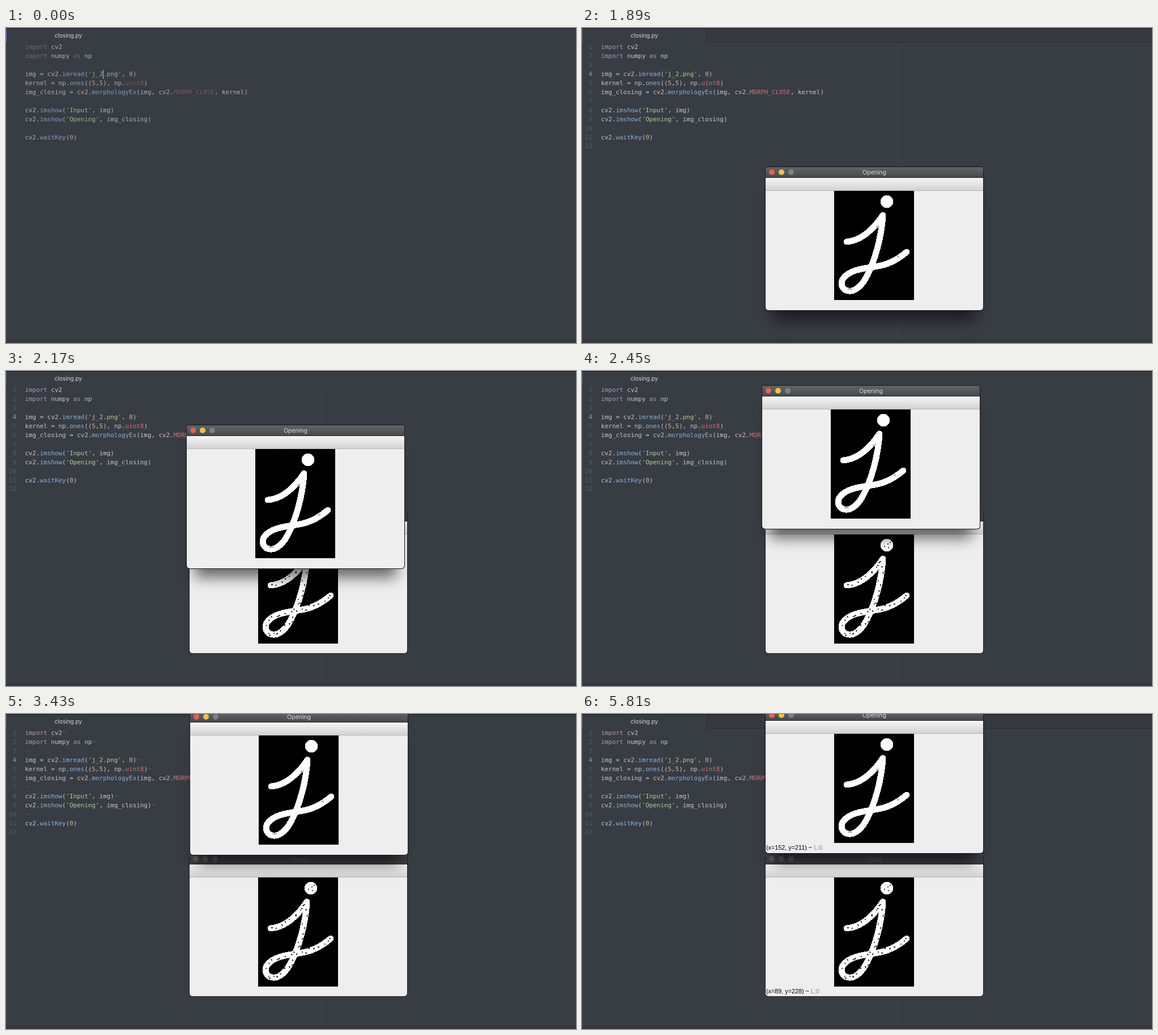
An HTML page for the animation above (5.88 s loop, 1006 by 557 pixels).

```html
<!DOCTYPE html>
<html lang="en">
<head>
<meta charset="utf-8">
<title>closing.py</title>
<style>
html, body { margin: 0; width: 100%; height: 100%; overflow: hidden; background: #383c43; }
#stage { position: absolute; inset: 0; width: 1006px; height: 557px; overflow: hidden; background: #383c43; }
#stage div, #stage pre { position: absolute; margin: 0; box-sizing: border-box; }
#topline { left: 0; top: 0; width: 1006px; height: 1px; background: #17191d; }
#foot { left: 0; top: 551px; width: 1006px; height: 6px; background: #35383e; }
#bar { left: 220px; top: 1px; width: 786px; height: 25px; background: #35383e; border: solid #2c2f34; border-width: 0 0 1px 1px; }
#accent { left: 0; top: 1px; width: 1px; height: 25px; }
#tab { left: 0; top: 1px; width: 220px; height: 25px; text-align: center; color: #d5d8dc; font: 10px/25px Inter, sans-serif; }
#guide { left: 557px; top: 27px; width: 1px; height: 524px; background: #434750; }
pre { font: 10.9px/15.95px "DejaVu Sans Mono", monospace; top: 26px; color: #c5c8c6; }
#gutter { left: 0; width: 18px; text-align: right; color: #585c63; }
#gutter b { color: #9b9fa6; }
#code { left: 33.5px; }
#code *, #gutter * { font-style: normal; font-weight: normal; text-decoration: none; }
#code b { color: #b294bb; }
#code i { color: #8ab2d8; }
#code u { color: #b9cb90; }
#code s { color: #d9b184; }
#code em { color: #c9727a; }
#code q { color: #5c6067; quotes: none; }
.idle #code { opacity: .82; }
.idle #code b, .idle #code em { opacity: .6; }
#caret { left: 171px; top: 74px; width: 1px; height: 16px; background: #a9c4f5; }
.win { left: 0; top: 0; width: 384px; height: 253px; border-radius: 5px; background: #eee; overflow: visible;
  box-shadow: 0 0 0 1px #15161a, 0 30px 24px -14px rgba(0,0,0,.58); }
.title { left: 0; top: 0; width: 384px; height: 19px; border-radius: 5px 5px 0 0; text-align: center; color: #d9dadb;
  font: 10.5px/19px Inter, sans-serif; background: linear-gradient(#636466, #48494b); border-bottom: 1px solid #222; }
.light { top: 4px; width: 10px; height: 10px; border-radius: 50%; }
.tools { left: 0; top: 19px; width: 384px; height: 23px; background: linear-gradient(#f5f5f5, #d3d3d3); border-bottom: 1px solid #b8b8b8; }
.win svg { position: absolute; left: 121px; top: 42px; background: #000; }
.status { left: 1px; top: 235px; color: #000; font: 10.8px/16px "Liberation Sans", Arial, sans-serif; white-space: pre; }
.status span { color: #8b8b8b; }
#input { height: 252px; box-shadow: 0 0 0 1px #1b1d21; }
#input .title { background: #3d3f45; color: #5b5d62; }
#input .light { background: #5a5c60 !important; }
</style>
</head>
<body>
<div id="stage">
  <div id="bar"></div><div id="tab">closing.py</div>
  <div id="topline"></div><div id="accent"></div><div id="guide"></div><div id="foot"></div>
  <pre id="gutter"></pre>
  <pre id="code"><b>import</b> cv2
<b>import</b> numpy <b>as</b> np

img = cv2.<i>imread</i>(<u>'j_2.png'</u>, <s>0</s>)
kernel = np.<i>ones</i>((<s>5</s>,<s>5</s>), np.<em>uint8</em>)
img_closing = cv2.<i>morphologyEx</i>(img, cv2.<em>MORPH_CLOSE</em>, kernel)

cv2.<i>imshow</i>(<u>'Input'</u>, img)
cv2.<i>imshow</i>(<u>'Opening'</u>, img_closing)

cv2.<i>waitKey</i>(<s>0</s>)</pre>
  <div id="caret"></div>
</div>
<script>
const $ = id => document.getElementById(id);
const stage = $('stage');
const LOOP = 5880, STEP = 70;

$('gutter').innerHTML = Array.from({length: 12}, (_, i) => i === 3 ? '<b>4</b>' : i + 1).join('\n');
$('code').innerHTML = $('code').innerHTML.split('\n').map(line => line + '<q>¬</q>').join('\n');
const eols = [...document.querySelectorAll('q')];

// The handwritten letter: hook, then stem, loop and tail
const hook = 'M22 90C46 88 68 70 86 43';
const stem = 'M86 43C84 80 72 125 56 154C46 172 34 178 26 177C14 176 10 164 16 155C26 140 52 137 72 134C95 131 112 122 128 108';

function addWindow(id, title, marks) {
  const lights = ['#e0625b', '#f0c04c', '#808184'].map((c, i) =>
    `<div class="light" style="left:${6 + 17 * i}px;background:${c}"></div>`).join('');
  stage.insertAdjacentHTML('beforeend', `<div class="win" id="${id}">
    <div class="title">${title}${lights}</div><div class="tools"></div>
    <svg width="141" height="193" shape-rendering="crispEdges">
      <g fill="none" stroke="#fff" stroke-width="11" stroke-linecap="round" stroke-linejoin="round">
        <path d="${hook}"/><path d="${stem}"/></g>
      <circle cx="93" cy="19" r="11.3" fill="#fff"/>${marks}</svg>
    <div class="status"></div></div>`);
  return $(id);
}

let seed = 11;
const rand = () => (seed = seed * 16807 % 2147483647) / 2147483647;
const speck = (x, y) => `<circle cx="${x}" cy="${y}" r="1.4" fill="#444"/>`;

function specksAlong(d) {
  const path = document.createElementNS('http://www.w3.org/2000/svg', 'path');
  path.setAttribute('d', d);
  let out = '';
  for (let s = 6; s < path.getTotalLength(); s += 5 + 7 * rand()) {
    const p = path.getPointAtLength(s);
    out += speck(p.x + 7 * (rand() - .5), p.y + 7 * (rand() - .5));
  }
  return out;
}

const holes = specksAlong(hook) + specksAlong(stem) +
  [[89, 21], [95, 17], [99, 14], [96, 23]].map(p => speck(...p)).join('');
const smudges = [[74, 62, 4, 3], [111, 115, 4, 3], [24, 172, 8, 3]].map(([x, y, w, h]) =>
  `<rect x="${x}" y="${y}" width="${w}" height="${h}" fill="#bbb"/>`).join('');
const input = addWindow('input', 'Input', holes);
const opening = addWindow('opening', 'Opening', smudges);

// Drag of the front window: time, x, y
const drag = [[1960, 324, 246], [2030, 322, 206], [2170, 319, 96], [2310, 318, 52], [2450, 318, 26],
  [2730, 319, 3], [3360, 325, -4], [3430, 325, -4], [3990, 324, -7]];

const clamp = v => Math.max(0, Math.min(1, v));
const mix = (a, b, p) => Math.round(a + (b - a) * p);

function dragAt(t) {
  let i = 0;
  while (i < drag.length - 2 && t > drag[i + 1][0]) i++;
  const [a, b] = [drag[i], drag[i + 1]];
  const p = clamp((t - a[0]) / (b[0] - a[0]));
  return [mix(a[1], b[1], p), mix(a[2], b[2], p)];
}

function place(win, [x, y], t) {
  const p = clamp((t - 1470) / 210), ease = 1 - (1 - p) ** 2;
  win.style.opacity = ease;
  win.style.transform = `translate(${x}px,${y}px)` + (p < 1 ? ` scale(${.85 + .15 * ease})` : '');
}

// Pointer readout moving from one position to another
function report(win, t, start, length, from, to) {
  const p = clamp((t - start) / length);
  win.querySelector('.status').innerHTML = t < start ? '' :
    `(x=${mix(from[0], to[0], p)}, y=${mix(from[1], to[1], p)}) ~ <span>L:0</span>`;
}

const show = (el, on) => el.style.visibility = on ? 'visible' : 'hidden';

function draw(now) {
  const t = Math.floor(now % LOOP / STEP) * STEP;
  const first = t < 70, dragging = t >= 1960 && t < 4060;
  stage.className = first ? 'idle' : '';
  for (const id of ['gutter', 'guide']) show($(id), !first);
  show($('bar'), !first && !dragging);
  $('accent').style.background = t < 1540 ? '#6484d6' : '#5d6167';
  show($('caret'), t < 385 || t >= 770 && t < 1190);
  const marked = t >= 3430 && t < 3710;
  eols.forEach((q, i) => {
    show(q, marked || i === 3 && !first);
    q.style.opacity = marked ? 1 : .4;
  });
  place(input, [324, 247], t);
  place(opening, dragAt(t), t);
  report(opening, t, 4760, 350, [150, 8], [152, 211]);
  report(input, t, 5110, 560, [152, 12], [89, 228]);
}

function tick() {
  draw(performance.now());
  requestAnimationFrame(tick);
}
tick();
</script>
</body>
</html>
```
